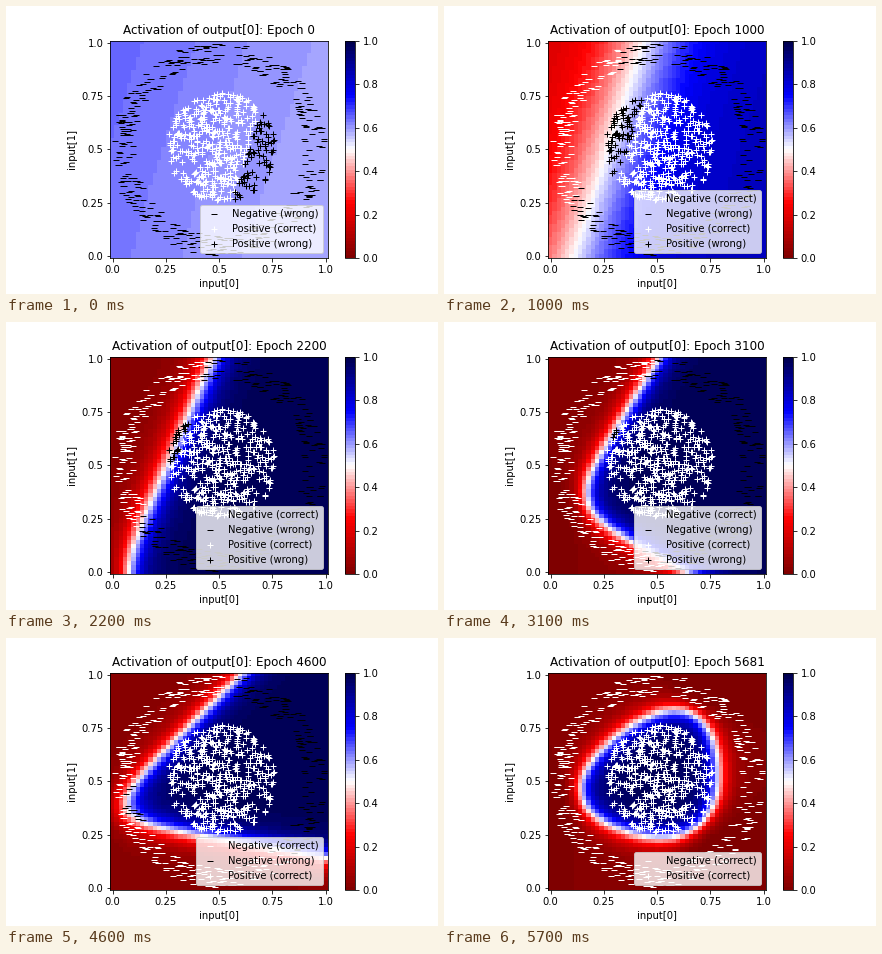
Recreate the animation shown at these times as a matplotlib script. Size 432 by 288 pixels, loop 5800 ms.

```python
import numpy as np
import matplotlib.pyplot as plt
from matplotlib.animation import FuncAnimation

plt.rcParams.update({"font.family": "DejaVu Sans", "font.size": 10})

FRAMES, STEP, LAST_EPOCH = 58, 100, 5681
CELLS = 50      # grid runs from 0 to CELLS in both directions
MARGIN = 0.4    # largest error that still counts as correct
CENTER = 0.51   # middle of the positive disk
REACH = 0.28    # final distance of each edge from the middle


def ramp(i, start, end):
    return np.clip((i - start) / (end - start), 0, 1)


def mix(a, b, t):
    return a + (b - a) * t


def ease_out(t):
    return 1 - (1 - t) ** 2


def sigmoid(z):
    return 1 / (1 + np.exp(-z))


def edge(x, y, angle, distance, steep, curve):
    """Soft half-plane facing the middle: 0 inside the edge, 1 outside."""
    c, s = np.cos(np.radians(angle)), np.sin(np.radians(angle))
    u, v = x - CENTER, y - CENTER
    depth = distance + c * u + s * v - curve * (c * v - s * u) ** 2
    return sigmoid(-steep * depth)


def activation(i, x, y):
    """Three edges sharpen, swing and close in around the disk."""
    steep = mix(3, 16, ramp(i, 4, 30))
    curve = mix(0, 0.6, ramp(i, 46, 57))
    edges = [
        # upper left, bottom, right
        (mix(-18, -55, ramp(i, 16, 57)), mix(0.23, REACH, ramp(i, 22, 38))),
        (mix(50, 80, ramp(i, 22, 46)), mix(2, REACH, ease_out(ramp(i, 10, 38)))),
        (180, mix(2, REACH, ramp(i, 22, 57))),
    ]
    outside = sum(edge(x, y, a, d, steep, curve) for a, d in edges)
    start = 1 - ease_out(ramp(i, 0, 4))
    bias = mix(-0.08, 4, ramp(i, 4, 18)) + 0.38 * start
    weight = mix(0.65, 8, ramp(i, 4, 20)) - 1.05 * start
    return sigmoid(bias - weight * outside)


def ring(rng, n, center, inner, outer):
    r = np.sqrt(rng.uniform(inner**2, outer**2, n))
    a = rng.uniform(0, 2 * np.pi, n)
    return center + r * np.cos(a), center + r * np.sin(a)


rng = np.random.default_rng(7)
negative = ring(rng, 400, 0.5, 0.4, 0.5)
positive = ring(rng, 450, CENTER, 0, 0.255)
gx, gy = np.meshgrid(*[np.linspace(0, 1, CELLS + 1)] * 2)

fig, ax = plt.subplots(figsize=(6, 4), dpi=72)
fig.subplots_adjust(left=0.125, right=0.9, bottom=0.125, top=0.88)
image = ax.imshow(activation(0, gx, gy), cmap=plt.get_cmap("seismic_r", 64),
                  vmin=0, vmax=1, origin="lower", interpolation="nearest")
fig.colorbar(image, ax=ax)

ticks = np.linspace(0, 1, 5)
ax.set_xticks(ticks * CELLS, [str(float(t)) for t in ticks])
ax.set_yticks(ticks * CELLS, [str(float(t)) for t in ticks])
ax.set_xlabel("input[0]")
ax.set_ylabel("input[1]")
title = ax.set_title("", pad=6.5)


def marks(name, marker):
    """Markers for the correct and the wrong points of one class."""
    return [ax.scatter([], [], marker=marker, color=color, linewidths=1,
                       label=f"{name} ({state})")
            for color, state in (("white", "correct"), ("black", "wrong"))]


groups = [(negative, 0, marks("Negative", "_")),
          (positive, 1, marks("Positive", "+"))]
ax.set(xlim=(-0.5, CELLS + 0.5), ylim=(-0.5, CELLS + 0.5))


def update(i):
    title.set_text(f"Activation of output[0]: Epoch {min(i * STEP, LAST_EPOCH)}")
    image.set_data(activation(i, gx, gy))
    shown = []
    for (x, y), target, dots in groups:
        ok = np.abs(activation(i, x, y) - target) < MARGIN
        for dot, mask in zip(dots, (ok, ~ok)):
            dot.set_offsets(np.column_stack([x[mask], y[mask]]) * CELLS)
            if mask.any():
                shown.append(dot)
    ax.legend(handles=shown, loc="lower right")


anim = FuncAnimation(fig, update, frames=FRAMES, interval=100,
                     repeat=True, repeat_delay=0, blit=False)
plt.show()
```
